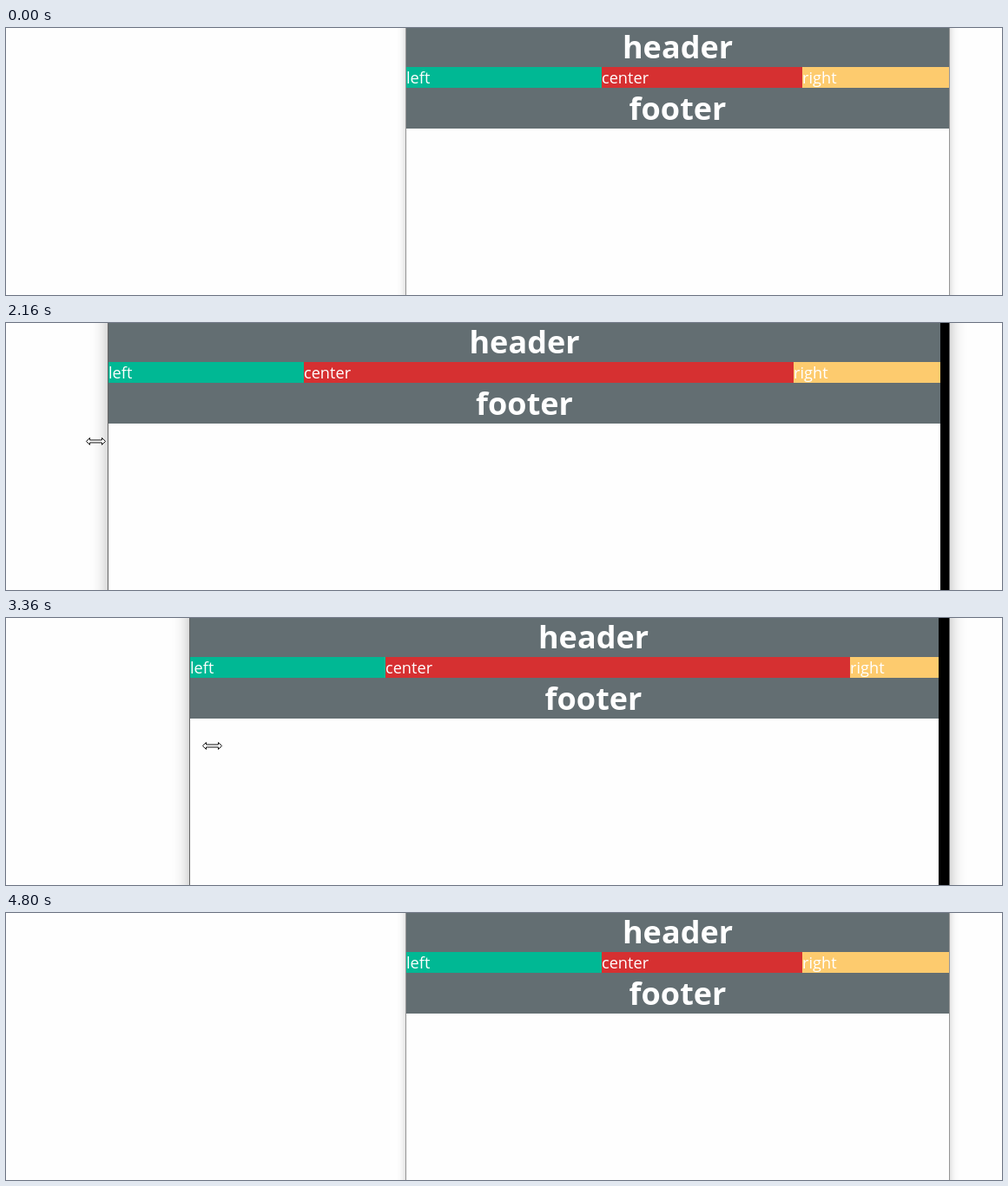
Animation, 1147 px wide and 308 px high, one loop 4860 ms. Source, as an HTML page:

```html
<!DOCTYPE html>
<html lang="en">
<head>
<meta charset="utf-8">
<title>Three-column layout</title>
<style>
  html, body { margin: 0; width: 100%; height: 100%; overflow: hidden; background: #fefefe; }
  body { position: relative; font: 500 18.2px/24px "Open Sans", "Noto Sans", sans-serif; color: #fff; }
  #win {
    position: absolute; top: -40px; bottom: -40px; background: #000;
    box-shadow: 0 0 0 1px #959595, 0 0 10px rgba(0, 0, 0, .25);
  }
  #win.active { box-shadow: 0 0 0 1px #666, 0 0 18px rgba(0, 0, 0, .32); }
  #view { position: absolute; top: 40px; left: 0; bottom: 0; overflow: hidden; background: #fefefe; }
  header, footer { background: #636e72; text-align: center; font-weight: 700; font-size: 36px; white-space: nowrap; }
  header { height: 45px; line-height: 44px; }
  footer { height: 47px; line-height: 48px; }
  #row { display: flex; height: 24px; }
  .left { flex: 0 0 225px; background: #00b894; }
  .center { flex: 1; background: #d63031; }
  .right { flex: 0 0 169px; background: #fdcb6e; }
  svg { position: absolute; left: 0; top: 0; width: 100%; height: 100%; }
  path { fill: #fff; stroke: #111; stroke-width: 1; }
</style>
</head>
<body>
<div id="win">
  <div id="view">
    <div id="page">
      <header>header</header>
      <div id="row">
        <div class="left">left</div>
        <div class="center">center</div>
        <div class="right">right</div>
      </div>
      <footer>footer</footer>
    </div>
  </div>
</div>
<svg><path id="cursor"/></svg>
<script>
const LOOP = 4860, STEP = 60, RIGHT = 1086, REST = 461;
const ARROW = 'M.5 .8V16.4L4.2 12.9 6.6 18.4 8.9 17.4 6.6 12.1H11.4Z';
const RESIZE = 'M-11 0L-7 -4V-1.5H7V-4L11 0L7 4V1.5H-7V4Z';

// Legs of a move: start, end, destination, ease-out power
const edgeLegs = [
  [1674, 2552, [32], 2],
  [3102, 3716, [REST], 1]
];
const pointerLegs = [
  [120, 660, [508, 148], 1.4],
  [660, 1080, [464, 148], 1],
  [1560, 1660, [449, 144], 1],
  [1670, 2508, [31.5, 135.5], 2],
  [3090, 3904, [654, 172], 1],
  [3904, 4320, [1135, 75], 1.2]
];

const $ = id => document.getElementById(id);
const win = $('win'), view = $('view'), page = $('page'), cursor = $('cursor');

function glide(legs, from, t) {
  let pos = from;
  for (const [start, end, to, power] of legs) {
    const k = Math.min(1, Math.max(0, (t - start) / (end - start)));
    const eased = 1 - (1 - k) ** power;
    pos = pos.map((v, i) => v + (to[i] - v) * eased);
  }
  return pos;
}

const edge = t => Math.round(glide(edgeLegs, [REST], t)[0]);

function draw(now) {
  const t = Math.floor(now % LOOP / STEP) * STEP;

  // The page repaints late: a black strip when growing, a stale layout when shrinking.
  const left = edge(t), width = RIGHT - left;
  const moved = left === REST ? 0 : left - edge(t - STEP);
  const strip = Math.floor(2 * Math.sqrt(Math.abs(moved)));
  win.style.left = left + 'px';
  win.style.width = width + 'px';
  win.className = t >= 1620 && t < 4800 ? 'active' : '';
  view.style.width = width - strip + 'px';
  page.style.width = width + (moved > 0 ? Math.round(moved * 1.3) : -strip) + 'px';

  const [x, y] = glide(pointerLegs, [1106, 58], t);
  cursor.style.display = t >= 120 && t < 4380 ? '' : 'none';
  cursor.setAttribute('d', t >= 1260 && t < 3960 ? RESIZE : ARROW);
  cursor.setAttribute('transform', `translate(${Math.floor(x) + .5} ${Math.floor(y) + .5})`);
}

const start = performance.now();
function tick() {
  draw(performance.now() - start);
  requestAnimationFrame(tick);
}
tick();
</script>
</body>
</html>
```
